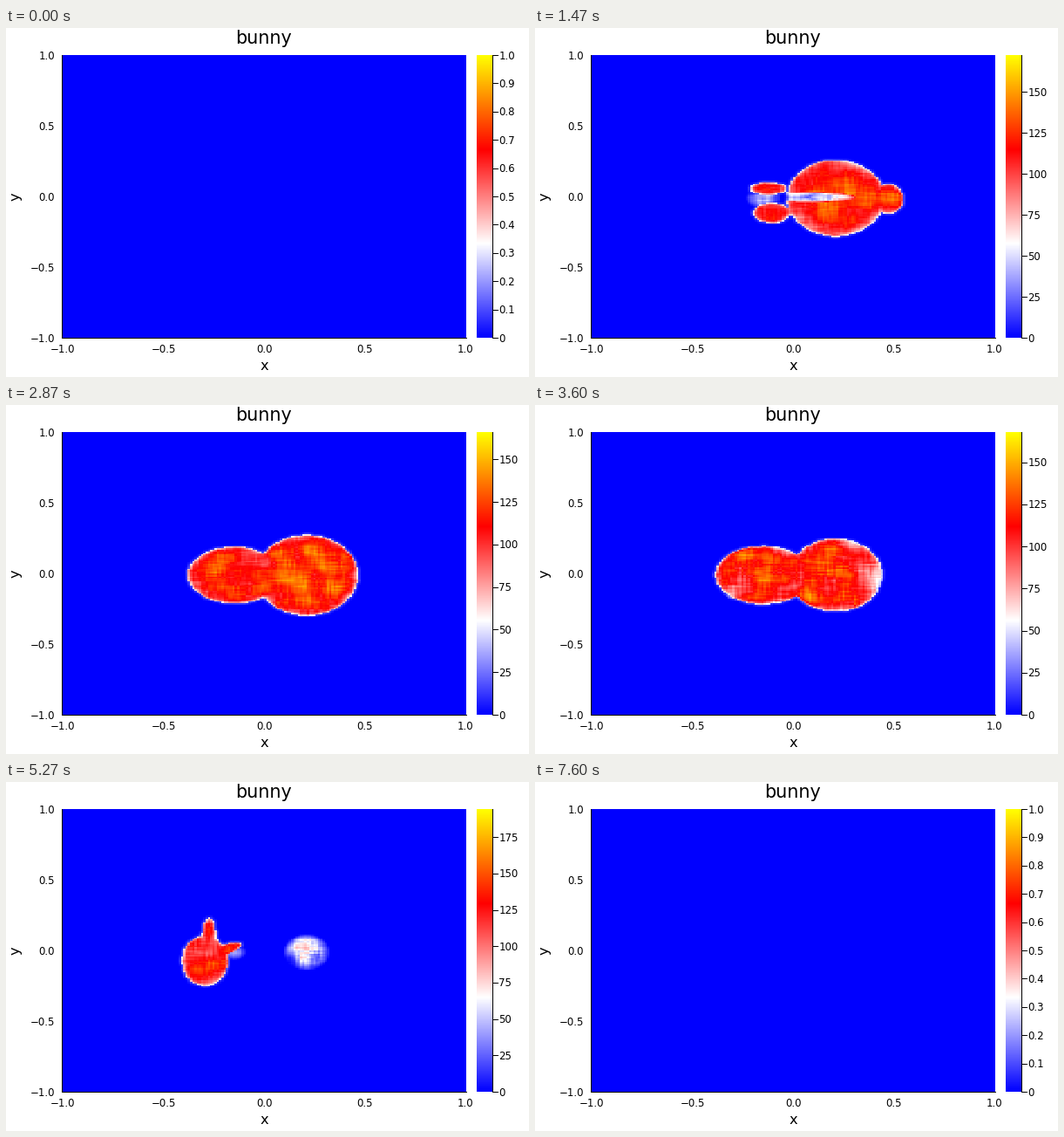
A matplotlib script that plays this animation: 600x400 px, repeating every 7.74 s.

```python
import numpy as np
import matplotlib.pyplot as plt
from matplotlib.animation import FuncAnimation
from matplotlib.colors import LinearSegmentedColormap

LOOP, STEP = 7740, 20          # ms
RATE = 0.015                   # slices per ms
SLICES = 116
FIRST, LAST = 3, 113
N = 180
LEFT, RIGHT, TOP, BOTTOM = 64, 528, 31, 355
PT = 0.72                      # points per pixel

plt.rcParams["font.family"] = "DejaVu Sans"
cmap = LinearSegmentedColormap.from_list("bwry", ["blue", "white", "red", "yellow"], N=512)

cell = (np.arange(N) + 0.5) / N
X, Y = np.meshgrid(LEFT + (RIGHT - LEFT) * cell, TOP + (BOTTOM - TOP) * cell)
rng = np.random.default_rng(7)


def blur(a, n=1, axes=(0, 1)):
    for _ in range(n):
        for axis in axes:
            a = (np.roll(a, 1, axis) + a + np.roll(a, -1, axis)) / 3
    return a


def cloud(n, axes=(0, 1)):
    a = blur(rng.normal(size=(N, N)), n, axes)
    return a / a.std()


layers = [0.07 * cloud(14) + 0.025 * (cloud(9, (0,)) + cloud(9, (1,))) for _ in range(21)]


def grain(k):
    i, w = divmod(k / 6, 1)
    return (1 - w) * layers[int(i)] + w * layers[int(i) + 1]


class Part:
    """Ellipsoid whose centre leans sideways as the slice height z grows."""

    def __init__(self, centre, radii, lean=(0, 0), turn=0):
        self.centre, self.radii, self.lean = centre, radii, lean
        self.turn = np.radians(turn)

    def field(self, z, stretch=1):
        """1 at the centre, 0 on the surface, negative outside."""
        (x, y, z0), (rx, ry, rz), (lx, ly) = self.centre, self.radii, self.lean
        dx, dy = X - x - lx * (z - z0), Y - y - ly * (z - z0)
        c, s = np.cos(self.turn), np.sin(self.turn)
        u, v = (dx * c + dy * s) / rx, (dy * c - dx * s) / ry
        return 1 - ((z - z0) / (rz * stretch)) ** 2 - u ** 2 - v ** 2

    def haze(self, z):
        """Faint cloud just past the upper and lower pole."""
        if abs(z - self.centre[2]) < self.radii[2]:
            return np.zeros((N, N))
        return 2 * np.clip(self.field(z, 1.2), 0, 1)


rump = Part((345, 195, 36), (60, 47, 40))
base = Part((330, 195, 6), (70, 38, 14))
tail = Part((408, 196, 25), (17, 18, 14), lean=(0.7, 0))
chest = Part((262, 195, 50), (56, 34, 25))
head = Part((228, 205, 71), (30, 33, 17))
paws = [Part((258, 184, 14), (26, 9, 14), lean=(1.2, 0)),
        Part((262, 212, 14), (26, 14, 14), lean=(1.2, 0))]
ears = [Part((236, 151, 94), (12, 30, 20), lean=(0.2, -1.6)),
        Part((281.6, 181, 94), (28.5, 8.7, 20), lean=(1.9, -0.7), turn=-20)]
parts = [rump, base, tail, chest, head, *paws, *ears]
hollow = Part((318, 194, 26), (52, 6, 16))


def section(k):
    if not FIRST <= k <= LAST:
        return np.zeros((N, N))
    noise = grain(k)
    depth = np.clip(np.max([p.field(k) for p in parts], axis=0), 0, 1)
    inside = (depth > 0).astype(float)
    edge = (inside + blur(inside)) / 2
    clay = 0.4 + 0.36 * depth ** 0.35 + noise
    clay -= np.clip(hollow.field(k), 0, 1) ** 0.5 * (0.5 + 3 * noise)
    fog = np.max([p.haze(k) for p in parts], axis=0) * (1 + 5 * noise)
    return np.clip(np.maximum(edge * clay, fog), 0, 1)


def peak(k):
    if not FIRST <= k <= LAST:
        return 1.0
    return np.interp(k, [3, 9, 22, 32, 54, 68, 90, 108, 113],
                     [16, 150, 172.6, 164, 168, 197.5, 191, 170, 16])


def tick_step(top):
    n = np.floor(np.log10(top))
    f = top / 10 ** n
    size = 2 if f > 5 else 1 if f > 2.5 else 0.5 if f > 1 else 0.2
    return size * 10 ** n / 2


def tick_text(v, step):
    if v == 0:
        return "0"
    places = len(f"{step:g}".partition(".")[2])
    return f"{v:.{places}f}"


sections = [section(k) for k in range(SLICES)]

fig = plt.figure(figsize=(6, 4), dpi=100, facecolor="white")
ax = fig.add_axes([0, 0, 1, 1])
ax.axis("off")


def label(x, y, s, px=11.8, ha="center", **kw):
    return ax.text(x, y, s, fontsize=px * PT, ha=ha, va="baseline", color="black", **kw)


def line(xs, ys):
    return ax.plot(xs, ys, color="black", lw=PT)[0]


def picture(data, x0, x1):
    return ax.imshow(data, cmap=cmap, vmin=0, vmax=1, interpolation="nearest",
                     aspect="auto", extent=(x0, x1, BOTTOM, TOP))


heat = picture(sections[0], LEFT, RIGHT)
picture(np.linspace(1, 0, BOTTOM - TOP)[:, None], 540, 558)
ax.set_xlim(0, 600)
ax.set_ylim(400, 0)

line([LEFT, RIGHT], [BOTTOM, BOTTOM])
line([LEFT, LEFT], [TOP, BOTTOM])
line([558, 558], [TOP, BOTTOM])

label(295.5, 18.5, "bunny", 20.7)
label(296, 392, "x", 16.2)
label(16, 193, "y", 16.2, rotation=90, rotation_mode="anchor")
for i in range(5):
    s = f"{i / 2 - 1:.1f}".replace("-", "\u2212")
    label(65 + 115.5 * i, 371.5, s)
    label(56, BOTTOM + 4.8 - 81 * i, s, ha="right")

marks = [line([558, 564], [0, 0]) for _ in range(12)]
names = [label(565.5, 0, "", ha="left") for _ in range(12)]


def draw(i):
    k = min(int((i * STEP + 14) * RATE), SLICES - 1)
    heat.set_data(sections[k])
    top = peak(k)
    step = tick_step(top)
    for j, (mark, name) in enumerate(zip(marks, names)):
        v = j * step
        shown = v <= top * (1 + 1e-9)
        mark.set_visible(shown)
        name.set_visible(shown)
        if shown:
            y = BOTTOM - (BOTTOM - TOP) * v / top
            mark.set_ydata([y, y])
            name.set_y(y + 4.5)
            name.set_text(tick_text(v, step))
    return [heat, *marks, *names]


anim = FuncAnimation(fig, draw, frames=LOOP // STEP, interval=STEP,
                     repeat=True, repeat_delay=0, blit=False)
plt.show()
```
